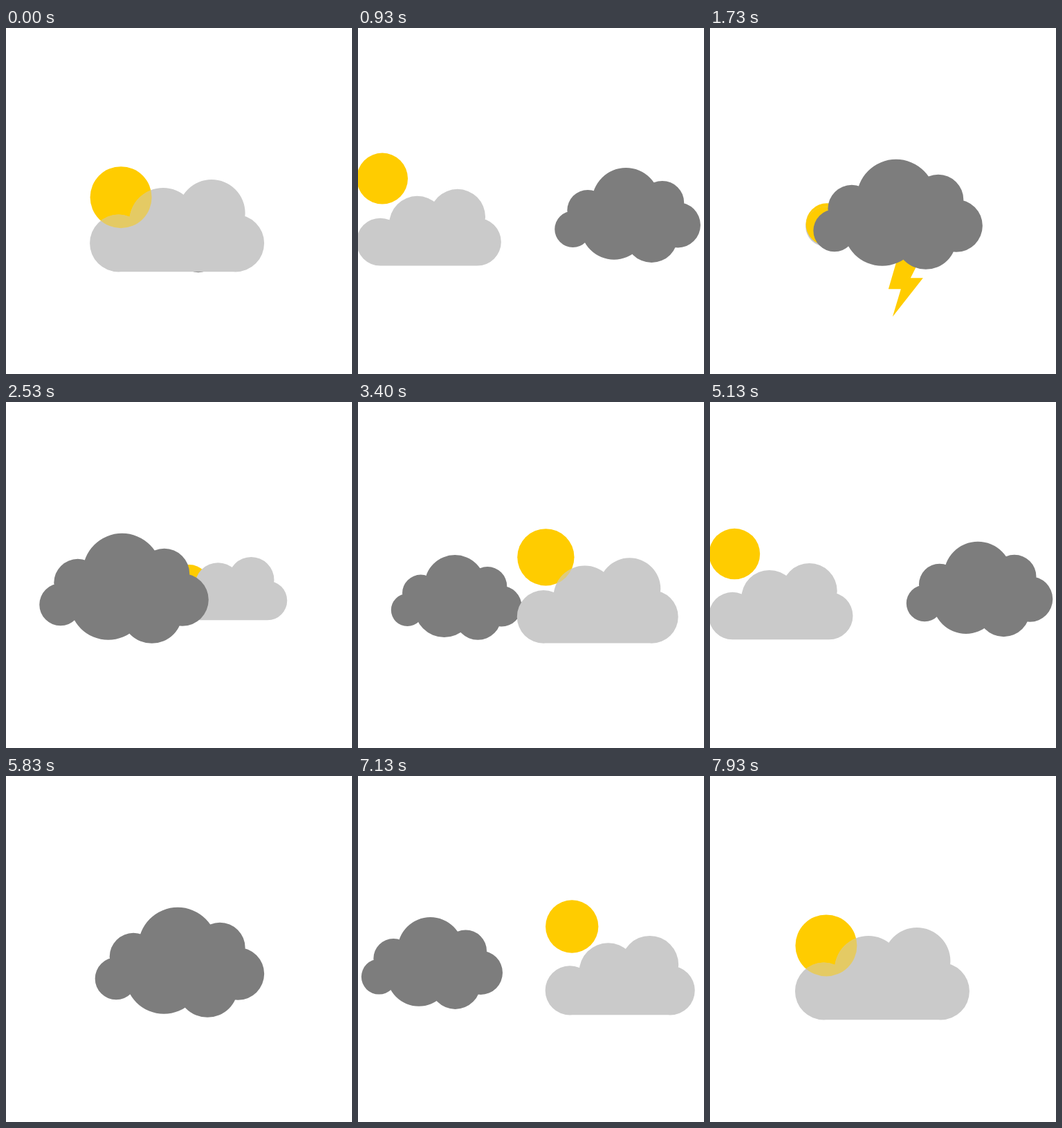
Animation of 500x500 px, one loop 8010 ms. Source, as an HTML page with a canvas:

```html
<!DOCTYPE html>
<html lang="en">
<head>
<meta charset="utf-8">
<title>Changing weather</title>
<style>
  html, body { margin: 0; width: 100%; height: 100%; overflow: hidden; background: #fff; }
  canvas { display: block; width: 500px; height: 500px; }
</style>
</head>
<body>
<canvas id="sky" width="500" height="500"></canvas>
<script>
const ctx = document.getElementById('sky').getContext('2d');
const LOOP = 8010, TURN = LOOP / 2, HALF = TURN / 2;
const SUN = '#ffcc00', LIGHT = '#cacaca', DARK = '#7d7d7d';
const CENTER = 248.5;

// Lobes as [x, y, radius] around each cloud's centre
const lightLobes = [[-84.5, 25.5, 41.5], [-20, -5.5, 49], [50, -18, 48.5], [84.5, 25.5, 41.5]];
const darkLobes = [[-92, 23.5, 30.5], [-67, -8, 34.5], [-3, -22.5, 57], [58, -21, 36.5],
  [84, 16.5, 38], [40, 35.5, 44], [-23, 18.5, 56]];
const boltPoints = [[0, 60], [34, 60], [18, 92], [36, 92], [-8, 148], [4, 108], [-14, 108]];

const mix = (a, b, u) => a + (b - a) * u;
const smooth = (a, b, v) => {
  const u = Math.min(1, Math.max(0, (v - a) / (b - a)));
  return u * u * (3 - 2 * u);
};

function cloudPath(lobes, base) {
  const path = new Path2D();
  for (const [x, y, r] of lobes) {
    path.moveTo(x + r, y);
    path.arc(x, y, r, 0, Math.PI * 2);
  }
  if (base) path.rect(-84.5, 10, 169, 56.8);
  return path;
}
const lightPath = cloudPath(lightLobes, true);
const darkPath = cloudPath(darkLobes, false);

// Orbit angle: rests near front and back, even speed between
function angle(q) {
  const back = q >= HALF, h = back ? q - HALF : q;
  let deg;
  if (h < 268) deg = 0.009 * (h + 60);
  else if (h > 1800) deg = 180 + 0.009 * (h - HALF + 60);
  else deg = mix(2.9, 178.7, (h - 268) / 1532);
  return (deg + (back ? 180 : 0)) * Math.PI / 180;
}

// 1 at the front, 0 at the back, with a short rest at the sides
function nearness(q) {
  const h = q % HALF;
  const fall = 1 - 0.55 * smooth(600, 960, h) - 0.45 * smooth(1120, 1700, h);
  return q < HALF ? fall : 1 - fall;
}

function level(g, back, side, front) {
  if (g < 0.45) return mix(back, side, g / 0.45);
  if (g > 0.55) return mix(side, front, (g - 0.55) / 0.45);
  return side;
}

function disc(x, y, r) {
  ctx.beginPath();
  ctx.arc(x, y, r, 0, Math.PI * 2);
  ctx.fill();
}

function place(x, y, s, draw) {
  ctx.save();
  ctx.translate(x, y);
  ctx.scale(s, s);
  draw();
  ctx.restore();
}

function drawLight(q, g) {
  const a = angle(q), side = Math.sin(a);
  const x = CENTER - side * (side > 0 ? 149 : 132.6);
  const y = level(g, 269.5, 288, 285.5);
  const s = mix(0.684, 1, g);
  const sunY = Math.cos(a) > 0 ? mix(245, 217, Math.abs(side)) : mix(285.5, 217, side * side);
  place(x, y, s, () => {
    const dy = (sunY - y) / s;
    ctx.fillStyle = SUN;
    disc(-81, dy, 44.5);
    ctx.fillStyle = LIGHT;
    ctx.fill(lightPath);
    // Sun shines through the cloud when close
    ctx.clip(lightPath);
    ctx.globalAlpha = 0.5 * g;
    ctx.fillStyle = SUN;
    disc(-81, dy, 44.5);
  });
}

function drawBolt(stretch) {
  ctx.fillStyle = SUN;
  ctx.beginPath();
  for (const [x, y] of boltPoints) ctx.lineTo(x, y * stretch);
  ctx.fill();
}

function drawDark(q, g) {
  const x = CENTER - Math.sin(angle(q)) * 144;
  const dip = Math.max(0, 1.5 - Math.abs(q - HALF) / 15);
  const y = level(g, 296, 270.5, 269.3) + dip;
  const d = q > HALF ? q - TURN : q;
  place(x, y, mix(0.7, 1, g), () => {
    if (d > -380 && d < -190) drawBolt(1);
    if (d > 20 && d < 110) drawBolt(0.89);
    ctx.fillStyle = DARK;
    ctx.fill(darkPath);
  });
}

function draw(t) {
  const q = t % TURN, p = (q + HALF) % TURN;
  const g = nearness(q), k = nearness(p);
  ctx.fillStyle = '#fff';
  ctx.fillRect(0, 0, 500, 500);
  if (g > k) {
    drawDark(p, k);
    drawLight(q, g);
  } else {
    drawLight(q, g);
    drawDark(p, k);
  }
}

// Steps alternate between 30 and 70 ms
function step(ms) {
  const t = ms % LOOP;
  const held = Math.floor(t / 100) * 100 + (t % 100 >= 30 ? 30 : 0);
  return Math.min(held, 7930);
}

const start = performance.now();
function tick() {
  draw(step(performance.now() - start));
  requestAnimationFrame(tick);
}
tick();
</script>
</body>
</html>
```
